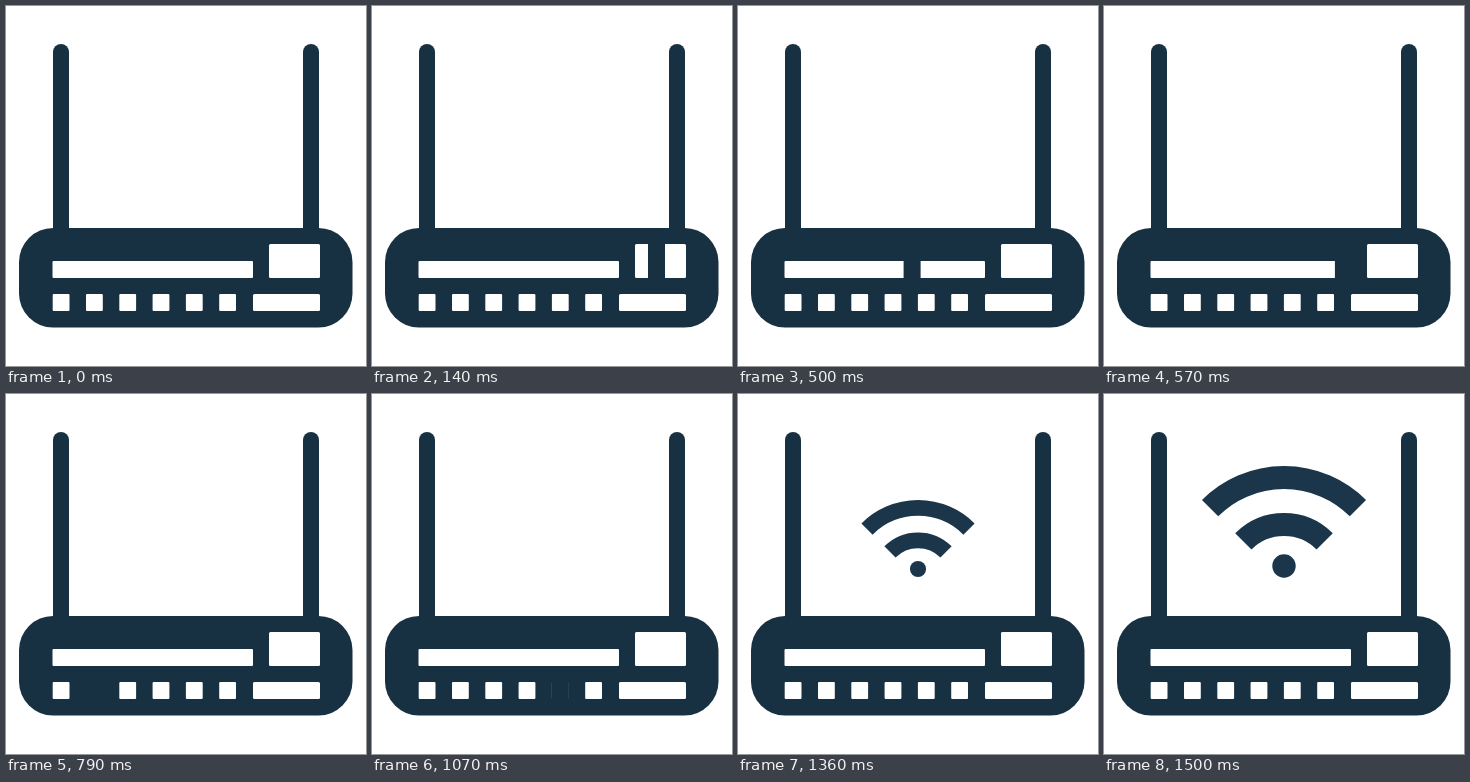
These frames come from a looping animation (360x360 px, 1570 ms). An HTML page:

```html
<!DOCTYPE html>
<html lang="en">
<head>
<meta charset="utf-8">
<title>Router</title>
<style>
  html, body { margin: 0; width: 100%; height: 100%; overflow: hidden; background: #fff; }
  svg { display: block; width: 100vw; height: 100vh; }
  .dark { fill: #183142; }
  .light { fill: #fff; }
  #wifi { fill: #1b364a; }
  #wifi path { fill: none; stroke: #1b364a; stroke-width: 23; }
</style>
</head>
<body>
<svg viewBox="0 0 360 360">
  <g class="dark">
    <rect x="47" y="38" width="16" height="200" rx="8"/>
    <rect x="297" y="38" width="16" height="200" rx="8"/>
    <rect x="13" y="222" width="333.5" height="99.5" rx="34"/>
  </g>
  <g class="light" id="panel">
    <rect x="46.5" y="255" width="200.5" height="17" rx="1"/>
    <rect x="263" y="238" width="51" height="34" rx="1.5"/>
    <rect x="247" y="288" width="67" height="17" rx="1.5"/>
  </g>
  <rect id="block" class="dark" width="17"/>
  <g id="wifi">
    <circle cx="180" cy="172" r="11.7"/>
    <path id="inner"/>
    <path id="outer"/>
  </g>
</svg>
<script>
  const LOOP = 1570, STEPS = 22;
  const $ = id => document.getElementById(id);
  const set = (el, attrs) => {
    for (const name in attrs) el.setAttribute(name, attrs[name]);
  };
  const portX = i => 46.7 + i * 33.3;

  for (let i = 0; i < 6; i++) {
    const port = document.createElementNS('http://www.w3.org/2000/svg', 'rect');
    set(port, { x: portX(i), y: 288, width: 16.8, height: 17, rx: 1 });
    $('panel').append(port);
  }

  // Quarter arc centred above (180, 188).
  function arc(r) {
    const d = r * Math.SQRT1_2;
    return `M${180 - d} ${188 - d}A${r} ${r} 0 0 1 ${180 + d} ${188 - d}`;
  }
  set($('inner'), { d: arc(57.5) });
  set($('outer'), { d: arc(104.5) });

  // The dark block crosses the screen, then the bar, then covers each port.
  function blockAt(step) {
    if (step >= 1 && step <= 4) return { x: 246 + 30 * (step - 1), y: 238, height: 34 };
    if (step >= 5 && step <= 8) return { x: 35 + 65.3 * (step - 5), y: 255, height: 17 };
    if (step >= 10 && step <= 16) {
      const port = step - 10 - (step > 13 ? 1 : 0);
      return { x: portX(port), y: 288, height: 17 };
    }
    return { height: 0 };
  }

  const startOf = step => Math.round(step * LOOP / STEPS / 10) * 10;

  function draw(now) {
    const t = now % LOOP;
    let step = STEPS - 1;
    while (startOf(step) > t) step--;

    set($('block'), blockAt(step));
    const scale = step < 17 ? 0 : 1 - 0.155 * (21 - step);
    set($('wifi'), {
      visibility: scale ? 'visible' : 'hidden',
      transform: `translate(180 181.6) scale(${scale}) translate(-180 -181.6)`
    });
  }

  const begin = performance.now();
  function tick() {
    draw(performance.now() - begin);
    requestAnimationFrame(tick);
  }
  tick();
</script>
</body>
</html>
```
